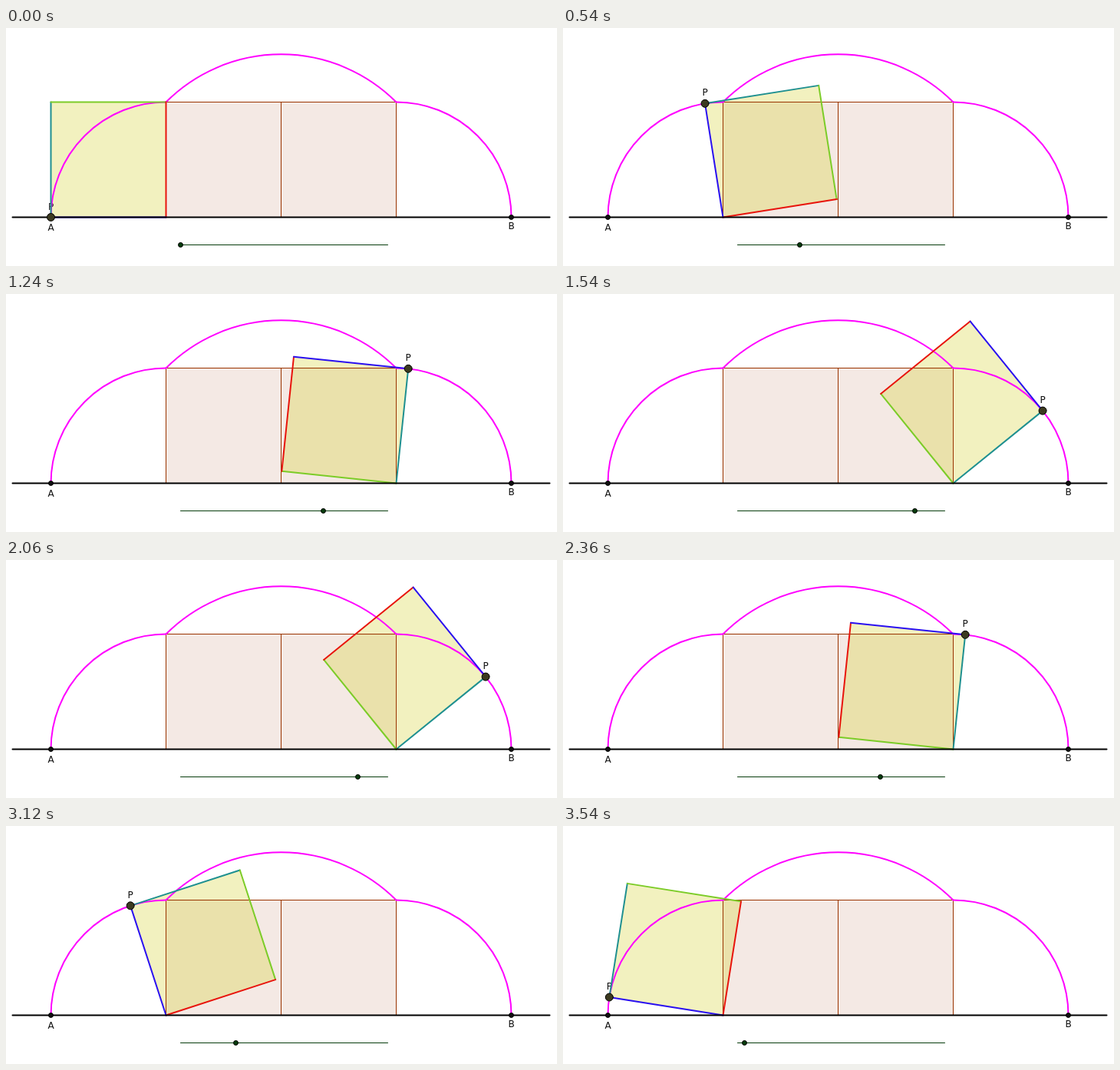
Write an HTML page with a canvas that moves like this. It is 718 by 310 pixels and loops after 3.56 s.

```html
<!DOCTYPE html>
<html lang="en">
<head>
<meta charset="utf-8">
<title>Rolling square</title>
<style>
html, body { margin: 0; width: 100%; height: 100%; overflow: hidden; background: #fff; }
canvas { display: block; }
</style>
</head>
<body>
<canvas id="stage" width="718" height="310"></canvas>
<script>
const ctx = document.getElementById('stage').getContext('2d');
const SIDE = 150, LEFT = 58.5, GROUND = 246.5;
const STEP = 20, STEPS = 178, DEGREES = 3;
const SLIDER = { x: 227.5, y: 282.5, length: 270 };
const EDGES = ['#1f9090', '#7ccc28', '#e8140c', '#2a10f0'];
const rad = deg => deg * Math.PI / 180;
const polar = (x, y, r, deg) => [x + r * Math.cos(rad(deg)), y + r * Math.sin(rad(deg))];

function line(a, b, color, width) {
  ctx.strokeStyle = color;
  ctx.lineWidth = width;
  ctx.beginPath();
  ctx.moveTo(...a);
  ctx.lineTo(...b);
  ctx.stroke();
}

function dot(x, y, r, fill) {
  ctx.beginPath();
  ctx.arc(x, y, r, 0, 2 * Math.PI);
  ctx.fillStyle = fill;
  ctx.fill();
  ctx.strokeStyle = '#000';
  ctx.lineWidth = 1;
  ctx.stroke();
}

function label(text, x, y) {
  ctx.fillStyle = '#111';
  ctx.fillText(text, x, y);
}

// Corners of the square after rolling by the given angle, starting with P
function corners(angle) {
  const turn = Math.min(2, Math.floor(angle / 90));
  const half = SIDE / Math.SQRT2;
  const [cx, cy] = polar(LEFT + SIDE * (turn + 1), GROUND, half, angle - 90 * turn - 135);
  return [135, 225, 315, 45].map(a => polar(cx, cy, half, a + angle));
}

function drawPath() {
  ctx.strokeStyle = '#ff00ff';
  ctx.lineWidth = 2;
  [[1, SIDE, 180, 270], [2, SIDE * Math.SQRT2, 225, 315], [3, SIDE, 270, 360]].forEach(([n, r, from, to]) => {
    ctx.beginPath();
    ctx.arc(LEFT + n * SIDE, GROUND, r, rad(from), rad(to));
    ctx.stroke();
  });
}

function draw(angle) {
  const square = corners(angle), [px, py] = square[0];
  const right = LEFT + 4 * SIDE;
  ctx.clearRect(0, 0, 718, 310);
  ctx.font = '12px "DejaVu Sans", sans-serif';
  ctx.textAlign = 'center';
  ctx.lineCap = 'round';

  ctx.fillStyle = 'rgba(153, 51, 0, 0.105)';
  ctx.fillRect(LEFT + SIDE, GROUND - SIDE, 2 * SIDE, SIDE);
  ctx.fillStyle = 'rgba(204, 200, 0, 0.25)';
  ctx.beginPath();
  square.forEach(p => ctx.lineTo(...p));
  ctx.fill();

  ctx.strokeStyle = '#993300';
  ctx.lineWidth = 1;
  for (const n of [1, 2]) ctx.strokeRect(LEFT + n * SIDE, GROUND - SIDE, SIDE, SIDE);

  label('P', px, py - 10);
  drawPath();
  square.forEach((p, i) => line(p, square[(i + 1) % 4], EDGES[i], 2));
  line([8.5, GROUND], [708.5, GROUND], '#000', 2);

  dot(LEFT, GROUND, 3, '#111');
  dot(right, GROUND, 3, '#111');
  label('A', LEFT, 264);
  label('B', right, 262);
  dot(px, py, 5, '#3c3a20');

  line([SLIDER.x, SLIDER.y], [SLIDER.x + SLIDER.length, SLIDER.y], '#063c0c', 1);
  dot(SLIDER.x + angle, SLIDER.y, 3, '#063c0c');
}

function frame() {
  const step = Math.floor(performance.now() / STEP) % STEPS;
  const angle = DEGREES * step;
  draw(angle <= 270 ? angle : 540 - angle);
  requestAnimationFrame(frame);
}
frame();
</script>
</body>
</html>
```
